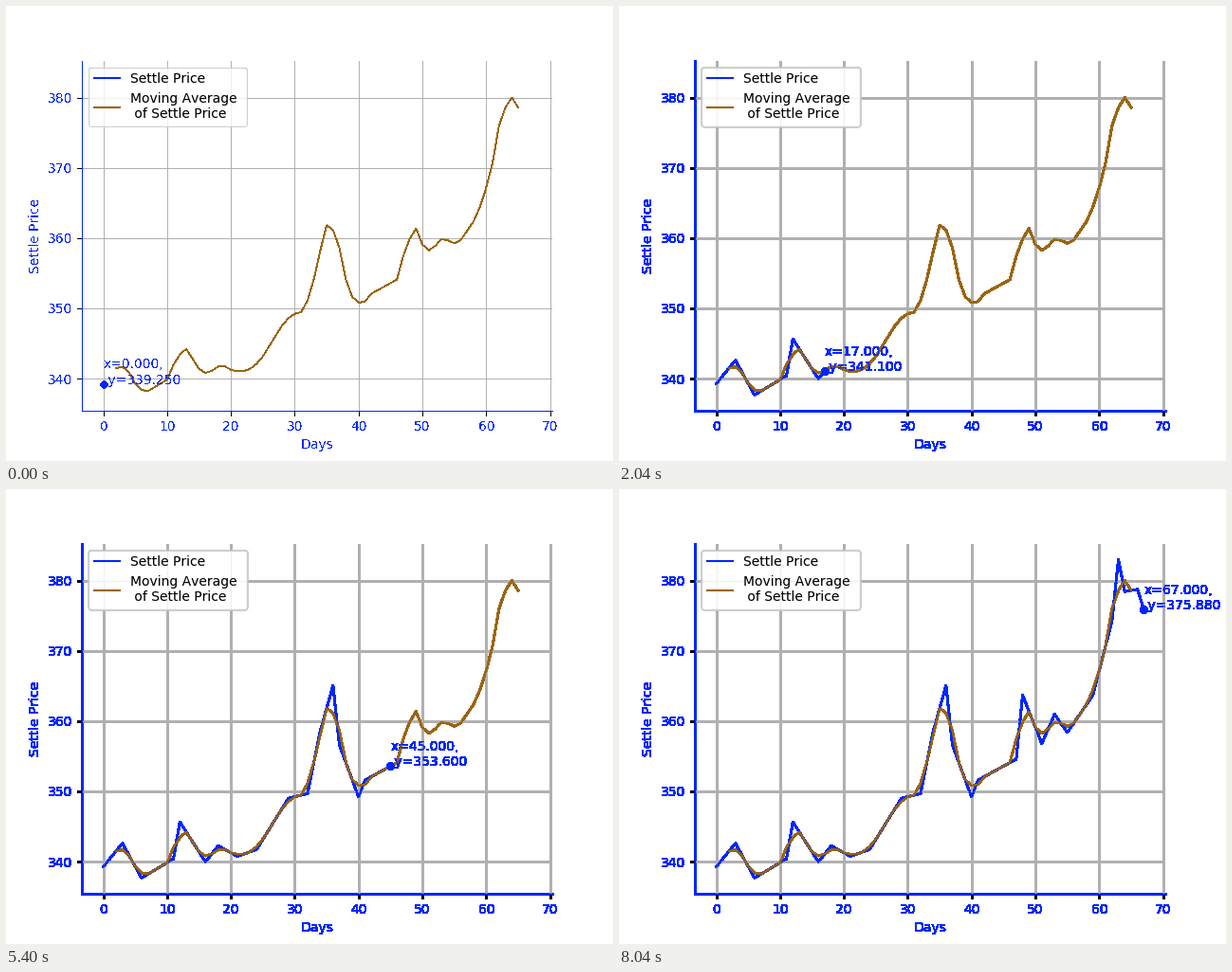
Recreate the animation shown at these times as a matplotlib script. Size 640 px wide and 480 px high, loop 8.16 s.

```python
import numpy as np
import matplotlib.pyplot as plt
from matplotlib.animation import FuncAnimation

BLUE, BROWN = "#0026ff", "#9a6510"
COUNT, STEP = 68, 120

# Turning points of the price as (day, price); straight runs in between.
TURNS = [
    (0, 339.25), (3, 342.6), (6, 337.65), (11, 340.4), (12, 345.65),
    (16, 339.95), (18, 342.25), (21, 340.75), (24, 341.7), (29, 349),
    (32, 349.7), (34, 358.6), (36, 365.1), (37, 356.6), (40, 349.2),
    (41, 351.6), (47, 354.6), (48, 363.7), (51, 356.8), (53, 361),
    (55, 358.4), (59, 363.7), (62, 374.3), (63, 383.05), (64, 378.5),
    (66, 378.8), (67, 375.88)]

days = np.arange(COUNT)
price = np.interp(days, *zip(*TURNS))
average = np.convolve(price, np.ones(3) / 3, "same")


def padded(values, margin=0.05):
    lo, hi = values.min(), values.max()
    pad = (hi - lo) * margin
    return lo - pad, hi + pad


def one_bit(cutoff):
    """Filter that makes each pixel either opaque or clear."""
    def apply(img, dpi):
        out = np.rint(img * 255).astype(np.uint8)
        out[..., 3] = np.where(img[..., 3] > cutoff, 255, 0)
        return out, 0, 0
    return apply


thin, bold = one_bit(0.5), one_bit(0)

plt.rcParams["text.kerning_factor"] = 6
fig, ax = plt.subplots(figsize=(6.4, 4.8), dpi=100, facecolor="white")
ax.patch.set_visible(False)
ax.grid(True)
ax.set_xlim(*padded(days))
ax.set_ylim(*padded(price))
ax.set_xlabel("Days", color=BLUE)
ax.set_ylabel("Settle Price", color=BLUE)
ax.tick_params(labelcolor=BLUE)
for side in ("top", "right"):
    ax.spines[side].set_visible(False)
for side in ("left", "bottom"):
    ax.spines[side].set_color(BLUE)

line, = ax.plot([], [], color=BLUE, label="Settle Price")
ax.plot(days[2:-2], average[2:-2], color=BROWN,
        label="Moving Average \n of Settle Price")
dot, = ax.plot([], [], "o", color=BLUE, markersize=5)
note = ax.text(0, 0, "", color=BLUE)
ax.legend(loc="upper left")


def draw(i):
    x, y = days[i], price[i]
    line.set_data(days[:i + 1], price[:i + 1])
    dot.set_data([x], [y])
    note.set_position((x, y))
    note.set_text(f"x={x:.3f},\n y={y:.3f}")
    # The loop opens with thin strokes, then turns bold.
    ax.set_agg_filter(bold if i else thin)
    return line, dot, note


anim = FuncAnimation(fig, draw, frames=COUNT, interval=STEP,
                     repeat=True, repeat_delay=0, blit=False,
                     cache_frame_data=False)
plt.show()
```
